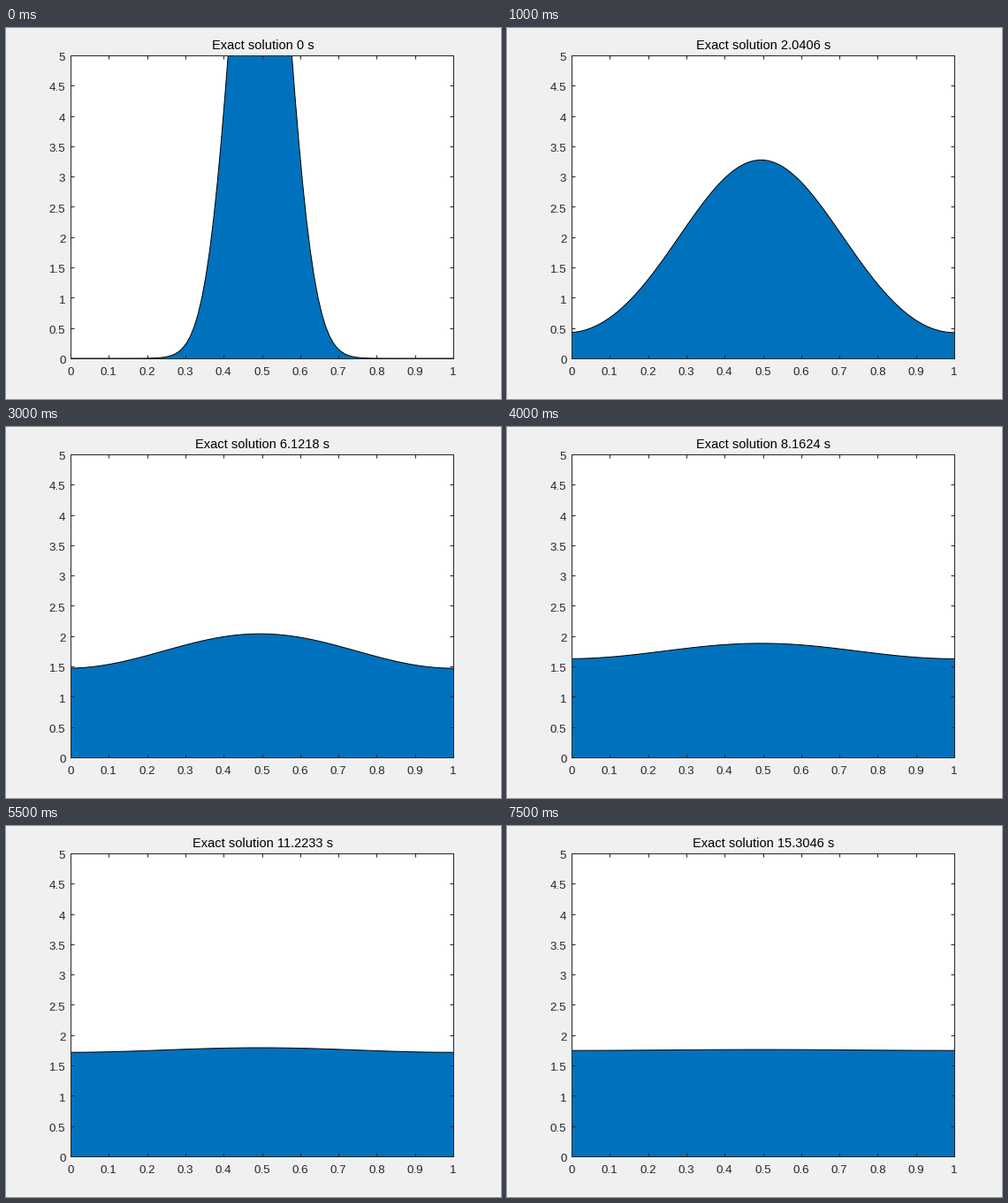
Write a matplotlib script that moves like this. It is 560 px wide and 420 px high and loops after 8 s.

```python
import numpy as np
import matplotlib.pyplot as plt
from matplotlib.animation import FuncAnimation
from matplotlib.patches import Polygon

W, H, DPI = 560, 420, 100
PX = 72 / DPI                                   # one pixel in points
LEFT, RIGHT, TOP, BOTTOM = 73, 506, 31, 374
FRAMES, INTERVAL = 16, 500
INK = (0.15, 0.15, 0.15)

plt.rcParams["font.family"] = "Liberation Sans"

# Periodic heat equation, solved mode by mode
N, DIFFUSION = 100, 0.01
x = np.linspace(0, 1, N)
STEP = 1e4 * x[1] ** 2
start = np.fft.fft(10 * np.exp(-100 * (x - x[49]) ** 2))
k = 2 * np.pi * np.fft.fftfreq(N, 1 / N)


def heat(t):
    return np.fft.ifft(start * np.exp(-DIFFUSION * k**2 * t)).real


fig = plt.figure(figsize=(W / DPI, H / DPI), dpi=DPI, facecolor="0.94")
ax = fig.add_axes([LEFT / W, 1 - BOTTOM / H, (RIGHT - LEFT) / W, (BOTTOM - TOP) / H])
ax.set(xlim=(0, 1), ylim=(0, 5),
       xticks=np.linspace(0, 1, 11), yticks=np.linspace(0, 5, 11))
ax.set_axisbelow(False)
ax.tick_params(direction="in", top=True, right=True, length=4.3 * PX, width=PX,
               color=INK, labelbottom=False, labelleft=False)
for spine in ax.spines.values():
    spine.set(linewidth=PX, edgecolor=INK)


def label(px, py, text, size=40 / 3, ha="center", color=INK):
    """Text with its baseline at a pixel position measured from the top left."""
    return fig.text(px / W, 1 - py / H, text, fontsize=size * PX,
                    ha=ha, va="baseline", color=color)


for i in range(11):
    f = i / 10
    label(LEFT + f * (RIGHT - LEFT), 393, f"{f:g}")
    label(67.4, BOTTOM + f * (TOP - BOTTOM) + 6.1, f"{5 * f:g}", ha="right")

title = label((LEFT + RIGHT) / 2 + 1, 24, "", size=44 / 3, color="black")
area = ax.add_patch(Polygon(np.zeros((3, 2)), facecolor="#0072BD", linewidth=0))
outline, = ax.plot([], [], color="black", linewidth=PX, zorder=1.5)


def update(i):
    t = i * STEP
    u = heat(t)
    area.set_xy(np.vstack([[0, 0], np.column_stack([x, u]), [1, 0]]))
    outline.set_data(x, u)
    title.set_text(f"Exact solution {round(t, 4):g} s")
    return area, outline, title


anim = FuncAnimation(fig, update, frames=FRAMES, interval=INTERVAL,
                     repeat=True, repeat_delay=0, blit=False)
plt.show()
```
